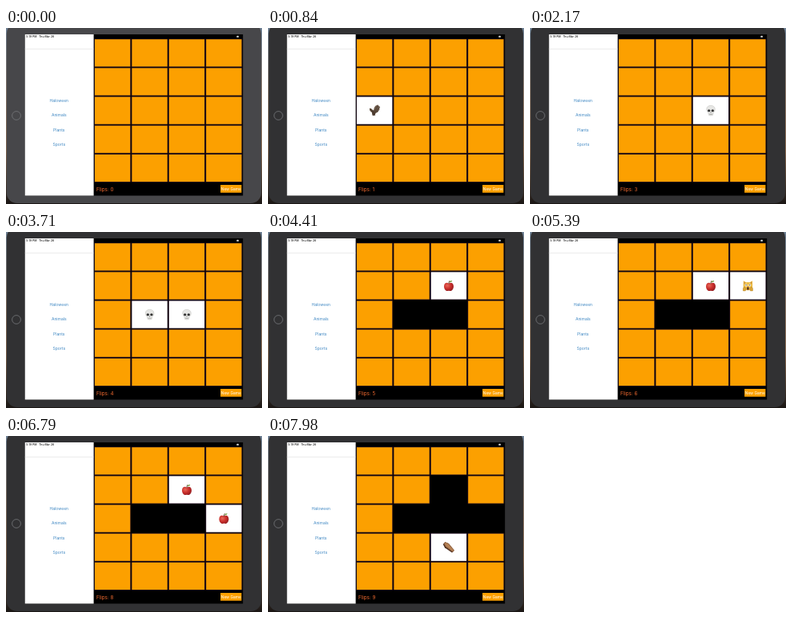
These frames come from a looping animation (320x221 px, 8000 ms). An HTML page:

```html
<!DOCTYPE html>
<html lang="en">
<head>
<meta charset="utf-8">
<title>Memory game</title>
<style>
  html, body { margin: 0; width: 100%; height: 100%; overflow: hidden; background: #1a1614; }
  svg { display: block; width: 100vw; height: 100vh; }
  text { font-family: Inter, "Liberation Sans", sans-serif; }
  .theme { font-size: 5px; fill: #3d86c2; text-anchor: middle; }
  .status { font-size: 3.5px; font-weight: 500; fill: #222; }
  .flips { font-size: 6.3px; fill: #f06a30; }
  .new { font-size: 4.85px; fill: #fff; text-anchor: middle; }
</style>
</head>
<body>
<svg viewBox="0 0 320 221">
  <defs>
    <linearGradient id="wall" x2="0" y2="1">
      <stop offset="0" stop-color="#6f8296"/>
      <stop offset=".35" stop-color="#8c7a6c"/>
      <stop offset=".7" stop-color="#8a6a50"/>
      <stop offset="1" stop-color="#1a1614"/>
    </linearGradient>
    <radialGradient id="red" cx=".35" cy=".35" r=".75">
      <stop offset="0" stop-color="#e8695a"/>
      <stop offset=".5" stop-color="#c92f2c"/>
      <stop offset="1" stop-color="#8f1b1f"/>
    </radialGradient>

    <g id="bat">
      <path d="M-1 0C-1-4 1-7 4.5-7.2 4.5-5.8 6-5.6 7-4.5 5.8-3.6 6.4-2 6-.8 4.8-.6 4.8 1 4 2 2.6 2 2 3.4.6 4Z" fill="#6d5a4a"/>
      <path d="M-1.6 1C-2.4-1.4-4-3-6.4-3 -5.8-1.6-6.4-.6-6-.2-5 .4-5 1.6-4 2.2Z" fill="#63503f"/>
      <path d="M-3-1.4-2.4-.5-1.2-.5-.4-1.4V1C1.4 2.4 1.2 5 .2 6.8L-.8 5.6-2 6.8C-3.4 4.6-3.4 2.4-3 1Z" fill="#4d3c30"/>
      <path d="M0 1 4.3-6.2M.3 1.6 6-3.8M.6 2.4 5-.2M-2.6 1.4-5.4-2" stroke="#372a21" stroke-width=".6" fill="none"/>
    </g>

    <g id="skull">
      <path d="M-5.3-2C-5.3-8 5.3-8 5.3-2 5.3.6 4.4 1.6 3.2 2.6L2.6 5.6Q0 7-2.6 5.6L-3.2 2.6C-4.4 1.6-5.3.6-5.3-2Z" fill="#e6e6e4" stroke="#c2c2be" stroke-width=".5"/>
      <ellipse cx="-2.3" cy="0" rx="1.7" ry="1.5" fill="#333"/>
      <ellipse cx="2.3" cy="0" rx="1.7" ry="1.5" fill="#333"/>
      <path d="M0 1.5-.7 2.8H.7Z" fill="#555"/>
      <path d="M-2 4.4Q0 5.2 2 4.4" fill="none" stroke="#8a8a86" stroke-width=".6"/>
    </g>

    <g id="apple">
      <path d="M0-3C2-5 6-4 6 .5 6 4 3.5 6.5 1.8 6.4 .8 6.3.5 6 0 6S-.8 6.3-1.8 6.4C-3.5 6.5-6 4-6 .5-6-4-2-5 0-3Z" fill="url(#red)"/>
      <path d="M0-2.6Q0-5 1-6.5" stroke="#5b3a22" stroke-width=".9" fill="none"/>
      <path d="M.6-4.3Q1.5-7 4.3-6.6 3.6-4.2.6-4.3Z" fill="#6f9a3a"/>
    </g>

    <g id="cat">
      <path d="M-5.6-6.5-2.2-4.4Q0-5 2.2-4.4L5.6-6.5 5.8-1Q6.5 5.5 0 5.7-6.5 5.5-5.8-1Z" fill="#edbd45"/>
      <path d="M-4.8-5.2-2.8-3.8-4.8-2.4ZM4.8-5.2 2.8-3.8 4.8-2.4Z" fill="#c68a45"/>
      <circle cx="-2.3" cy="-1" r="1.5" fill="#fff"/>
      <circle cx="2.3" cy="-1" r="1.5" fill="#fff"/>
      <circle cx="-2.3" cy="-1" r=".7" fill="#3a2a1a"/>
      <circle cx="2.3" cy="-1" r=".7" fill="#3a2a1a"/>
      <ellipse cx="0" cy="3.3" rx="1.4" ry="1.9" fill="#5b3320"/>
      <path d="M-.8.6H.8L0 1.4Z" fill="#b9615a"/>
      <path d="M-6 6.3Q-6.8 2-4.3 1.2L-2.6 2.7-3 6.3ZM6 6.3Q6.8 2 4.3 1.2L2.6 2.7 3 6.3Z" fill="#dca634" stroke="#a97824" stroke-width=".4"/>
    </g>

    <g id="coffin" transform="rotate(43)">
      <path d="M-8-1.6-3.5-3.4 7.5-1.9V2.1L-3.5 3.6-8 2Z" fill="#4e3020"/>
      <path d="M-8-2-3.5-3.6 7.5-2.2V.8L-3.5 2.1-8 .6Z" fill="#9b6a45"/>
      <path d="M-6.8-1.4-3.4-2.6 6.3-1.4V.1L-3.4 1.1-6.8.1Z" fill="#b58155"/>
    </g>
  </defs>

  <rect width="320" height="221" fill="url(#wall)"/>
  <rect id="body" x=".8" y="-6" width="318.2" height="226" rx="13" fill="#313133"/>
  <circle cx="13" cy="110" r="5.4" fill="none" stroke="#77787b" stroke-width=".8"/>

  <rect x="23.7" y="8" width="272.5" height="202.5" fill="#000"/>
  <rect x="23.7" y="8" width="85.9" height="202.5" fill="#fff"/>
  <path d="M23.7 26.3H109.6" stroke="#dcdcdc" stroke-width=".6"/>
  <text class="status" x="25.3" y="12.1">5:19 PM</text>
  <text class="status" x="41" y="12.1">Thu Mar 26</text>
  <rect x="288.3" y="9.8" width="2.6" height="2" rx=".6" fill="#ddd"/>

  <text class="theme" x="66.3" y="92.8">Haloween</text>
  <text class="theme" x="66.3" y="111.2">Animals</text>
  <text class="theme" x="66.3" y="129.7">Plants</text>
  <text class="theme" x="66.3" y="148.1">Sports</text>

  <g id="board"></g>
  <text class="flips" id="flips" x="113" y="205">Flips: 0</text>
  <rect x="268.1" y="197" width="26.3" height="9.8" fill="#fca000"/>
  <text class="new" x="281.3" y="203.7">New Game</text>
</svg>
<script>
const LOOP = 8000, COLS = 4, ROWS = 5;
const NS = 'http://www.w3.org/2000/svg';

// time of each tap, card index, picture
const taps = [
  [490, 8, 'bat'],
  [1260, 9, 'skull'],
  [1890, 10, 'skull'],
  [3150, 9, 'skull'],
  [4340, 6, 'apple'],
  [5040, 7, 'cat'],
  [6020, 11, 'apple'],
  [6580, 6, 'apple'],
  [7280, 14, 'coffin']
];

const make = (tag, attrs, parent) => {
  const el = document.createElementNS(NS, tag);
  for (const key in attrs) el.setAttribute(key, attrs[key]);
  return parent.appendChild(el);
};

const board = document.getElementById('board');
const label = document.getElementById('flips');
const cards = Array.from({ length: COLS * ROWS }, (_, i) => {
  const x = 111 + (i % COLS) * 46.4;
  const y = 14.2 + Math.floor(i / COLS) * 36.15;
  const g = make('g', { transform: `translate(${x} ${y})` }, board);
  make('rect', { x: -.7, y: -.7, width: 45.7, height: 35.6, fill: '#220d20' }, g);
  const face = make('rect', { width: 44.3, height: 34.2 }, g);
  const tap = taps.find(t => t[1] === i);
  const icon = tap && make('use', { href: '#' + tap[2], x: 22.2, y: 17.3 }, g);
  return { g, face, icon };
});

// The camera's exposure settles just after the start.
document.getElementById('body').animate([
  { fill: '#47474a', offset: 0 },
  { fill: '#313133', offset: .05 },
  { fill: '#313133', offset: 1 }
], { duration: LOOP, iterations: Infinity });

// Replays the taps: a pair stays open until the next tap, then closes or leaves.
function stateAt(time) {
  let open = [], flips = 0;
  const gone = new Set();
  for (const [at, card, kind] of taps) {
    if (at > time) break;
    if (open.length === 2) {
      if (open[0].kind === open[1].kind) open.forEach(o => gone.add(o.card));
      open = [];
    }
    open.push({ card, kind });
    flips++;
  }
  return { open: new Set(open.map(o => o.card)), gone, flips };
}

let shown = -1;
function render(time) {
  const { open, gone, flips } = stateAt(time);
  if (flips === shown) return;
  shown = flips;
  label.textContent = 'Flips: ' + flips;
  cards.forEach(({ g, face, icon }, i) => {
    const up = open.has(i);
    g.style.display = gone.has(i) ? 'none' : '';
    face.setAttribute('fill', up ? '#fff' : '#fca000');
    if (icon) icon.style.display = up ? '' : 'none';
  });
}

const start = performance.now();
function tick() {
  render((performance.now() - start) % LOOP);
  requestAnimationFrame(tick);
}
tick();
</script>
</body>
</html>
```
